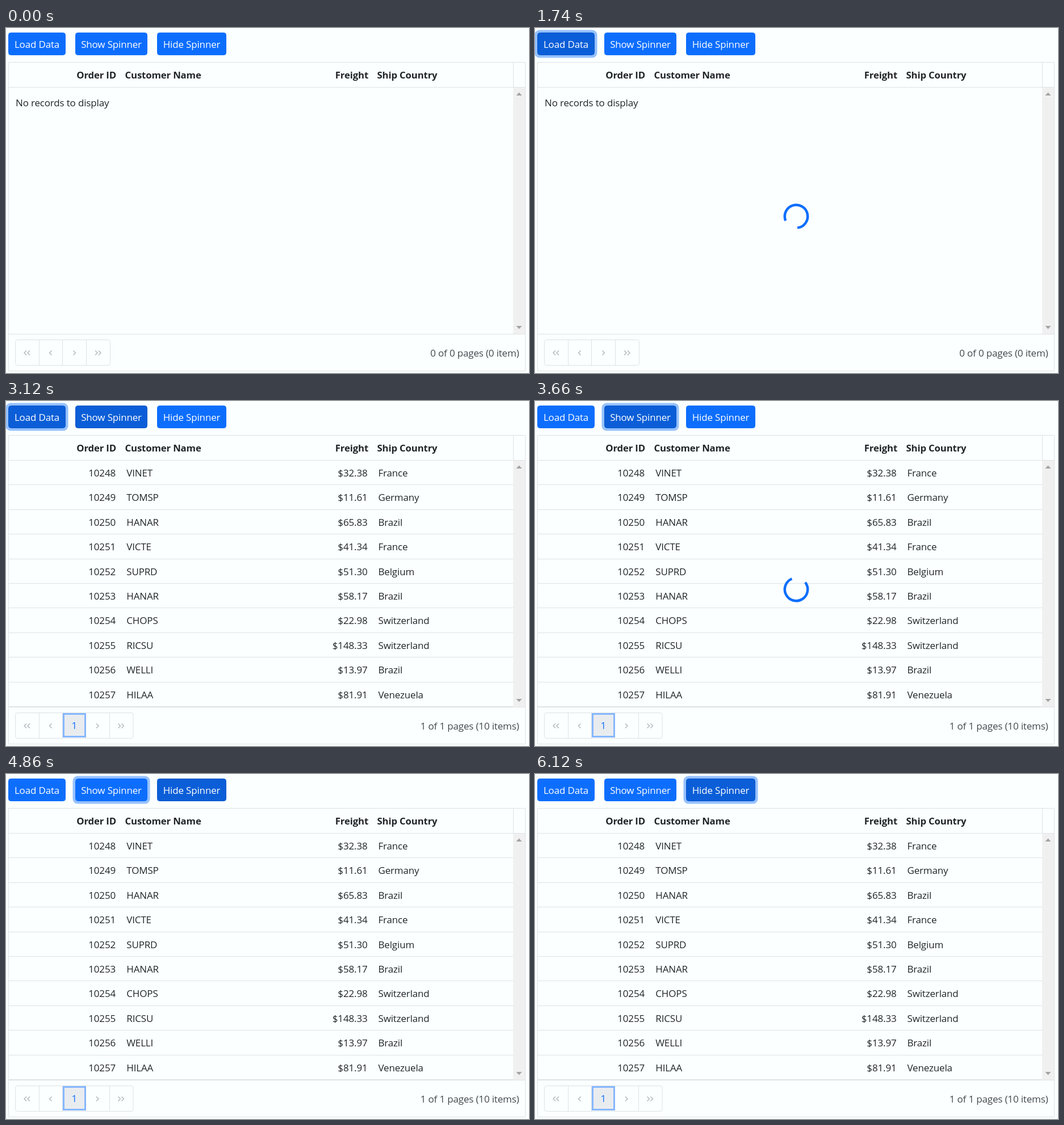
Write an HTML page that moves like this. It is 921 px wide and 608 px high and loops after 6.18 s.

```html
<!DOCTYPE html>
<html lang="en">
<head>
<meta charset="utf-8">
<title>Grid with spinner</title>
<style>
  html, body { margin: 0; width: 100%; height: 100%; overflow: hidden; background: #fbffff; }
  svg { display: block; width: 100%; height: 100%; }
  text { font: 17px "Open Sans", "Noto Sans", sans-serif; letter-spacing: -.165px; fill: #212529; }
  .head { font-size: 16.8px; font-weight: 700; }
  .label { fill: #fff; }
  .info { fill: #41474d; }
  .line { fill: none; stroke: #dee2e6; }
  .chevron { fill: none; stroke: #a9b0b7; stroke-width: 1.2; }
</style>
</head>
<body>
<svg id="stage" viewBox="0 0 921 608"></svg>
<script>
const LOOP = 6180, STEP = 60, LOADED = 2280;
const PLAIN = [13, 110, 253], DARK = [11, 94, 215], DARK_EDGE = [10, 88, 202];
const stage = document.getElementById('stage');

function add(tag, attrs, parent = stage, content = '') {
  const el = document.createElementNS('http://www.w3.org/2000/svg', tag);
  for (const key in attrs) el.setAttribute(key, attrs[key]);
  el.textContent = content;
  parent.appendChild(el);
  return el;
}

const write = (content, x, y, anchor = 'start', parent = stage, cls = '') =>
  add('text', { x, y, 'text-anchor': anchor, class: cls }, parent, content);
const line = (d, parent = stage) => add('path', { d, class: 'line' }, parent);

function addButton(label, x, width) {
  const ring = add('rect', {
    x: x - 2.25, y: 5.75, width: width + 4.5, height: 44.5, rx: 6.5,
    fill: 'none', stroke: '#96c1fe', 'stroke-width': 4.5
  });
  const face = add('rect', { x: x + .5, y: 8.5, width: width - 1, height: 39, rx: 4 });
  write(label, x + width / 2, 34.5, 'middle', stage, 'label');
  return { ring, face };
}

function chevrons(x, dir, count, parent) {
  for (let i = 0; i < count; i++) {
    const cx = x + (count > 1 ? i * 6 - 3 : 0);
    add('path', { d: `M${cx + 2 * dir} 568.5l${-4 * dir} 4l${4 * dir} 4`, class: 'chevron' }, parent);
  }
}

function addPager(right, dividers, parent) {
  add('rect', { x: 16.5, y: 549.5, width: right - 16.5, height: 45, rx: 4, class: 'line' }, parent);
  dividers.forEach(x => line(`M${x} 549.5v45`, parent));
  chevrons(37, 1, 2, parent);
  chevrons(78.5, 1, 1, parent);
  chevrons(right - 63, -1, 1, parent);
  chevrons(right - 21.5, -1, 2, parent);
}

// Toolbar
const buttons = [
  addButton('Load Data', 4, 101),
  addButton('Show Spinner', 122, 127),
  addButton('Hide Spinner', 266, 122)
];

// Grid frame, header and scrollbar
add('rect', { x: 893, y: 105, width: 21, height: 434, fill: '#f0f0f0' });
add('path', { d: 'M898.5 119h10l-5 -5.5zM898.5 525h10l-5 5.5z', fill: '#a3a3a3' });
line('M4.5 60.5H914.5V604.5H4.5zM4.5 104.5H914.5M893.5 60.5V104.5M4.5 539.5H914.5');
write('Order ID', 194, 88.5, 'end', stage, 'head');
write('Customer Name', 209.5, 88.5, 'start', stage, 'head');
write('Freight', 638, 88.5, 'end', stage, 'head');
write('Ship Country', 653.5, 88.5, 'start', stage, 'head');

// Empty state
const empty = add('g', {});
write('No records to display', 17, 137.6, 'start', empty);
addPager(183.5, [58.5, 99.5, 141.5], empty);
write('0 of 0 pages (0 item)', 903.5, 579, 'end', empty, 'info');

// Loaded state
const loaded = add('g', {});
const rows = [
  ['VINET', '32.38', 'France'],
  ['TOMSP', '11.61', 'Germany'],
  ['HANAR', '65.83', 'Brazil'],
  ['VICTE', '41.34', 'France'],
  ['SUPRD', '51.30', 'Belgium'],
  ['HANAR', '58.17', 'Brazil'],
  ['CHOPS', '22.98', 'Switzerland'],
  ['RICSU', '148.33', 'Switzerland'],
  ['WELLI', '13.97', 'Brazil'],
  ['HILAA', '81.91', 'Venezuela']
];
rows.forEach(([name, freight, country], i) => {
  const y = 132.6 + i * 43.48;
  write(10248 + i, 193, y, 'end', loaded);
  write(name, 212.3, y, 'start', loaded);
  write('$' + freight, 636.5, y, 'end', loaded);
  write(country, 655.5, y, 'start', loaded);
  line(`M4.5 ${Math.floor(147.75 + i * 43.42) + .5}H893`, loaded);
});
addPager(224, [58.5, 99.5, 140.5, 182.5], loaded);
add('rect', {
  x: 101.5, y: 551.5, width: 38, height: 40, fill: '#e9ecef', stroke: '#86b7fe', 'stroke-width': 3
}, loaded);
write('1', 120.3, 578.3, 'middle', loaded).style.fill = '#0d6efd';
write('1 of 1 pages (10 items)', 903.5, 579, 'end', loaded, 'info');

// Spinner: an open ring whose gap is centred on angle 0
const RADIUS = 20.2, HALF_GAP = 37 * Math.PI / 180;
const gx = RADIUS * Math.cos(HALF_GAP), gy = RADIUS * Math.sin(HALF_GAP);
const spinner = add('path', {
  d: `M${gx} ${gy}A${RADIUS} ${RADIUS} 0 1 1 ${gx} ${-gy}`,
  fill: 'none', stroke: '#0d6efd', 'stroke-width': 4.5
});

const within = (t, from, to) => t >= from && t < to;
const ramp = (t, from) => Math.min(1, Math.max(0, (t - from) / 150));
const show = (el, on) => el.setAttribute('visibility', on ? 'visible' : 'hidden');
const mix = (a, b, k) => `rgb(${a.map((c, i) => Math.round(c + (b[i] - c) * k))})`;

function paint(button, dark, ring) {
  button.face.setAttribute('fill', mix(PLAIN, DARK, dark));
  button.face.setAttribute('stroke', mix(PLAIN, DARK_EDGE, dark));
  button.ring.setAttribute('opacity', ring);
}

function draw(t) {
  const first = within(t, 1260, LOADED);
  show(spinner, first || within(t, 3420, 4860));
  const angle = (first ? 121 + (t - 1740) * .48 : 285 + (t - 3660) * .48) % 360;
  spinner.setAttribute('transform', `translate(460 332) rotate(${angle})`);

  show(empty, t < LOADED);
  show(loaded, t >= LOADED);

  const toShow = ramp(t, 3360), toHide = ramp(t, 4890);
  paint(buttons[0], t >= 780 ? 1 - toShow : 0, ramp(t, 1200) - toShow);
  paint(buttons[1], within(t, 3120, 4800) ? 1 : 0, toShow - toHide);
  paint(buttons[2], t >= 4800 ? 1 : 0, toHide);
}

const start = performance.now();
function tick() {
  const t = (performance.now() - start) % LOOP;
  draw(Math.floor(t / STEP) * STEP);
  requestAnimationFrame(tick);
}
tick();
</script>
</body>
</html>
```
